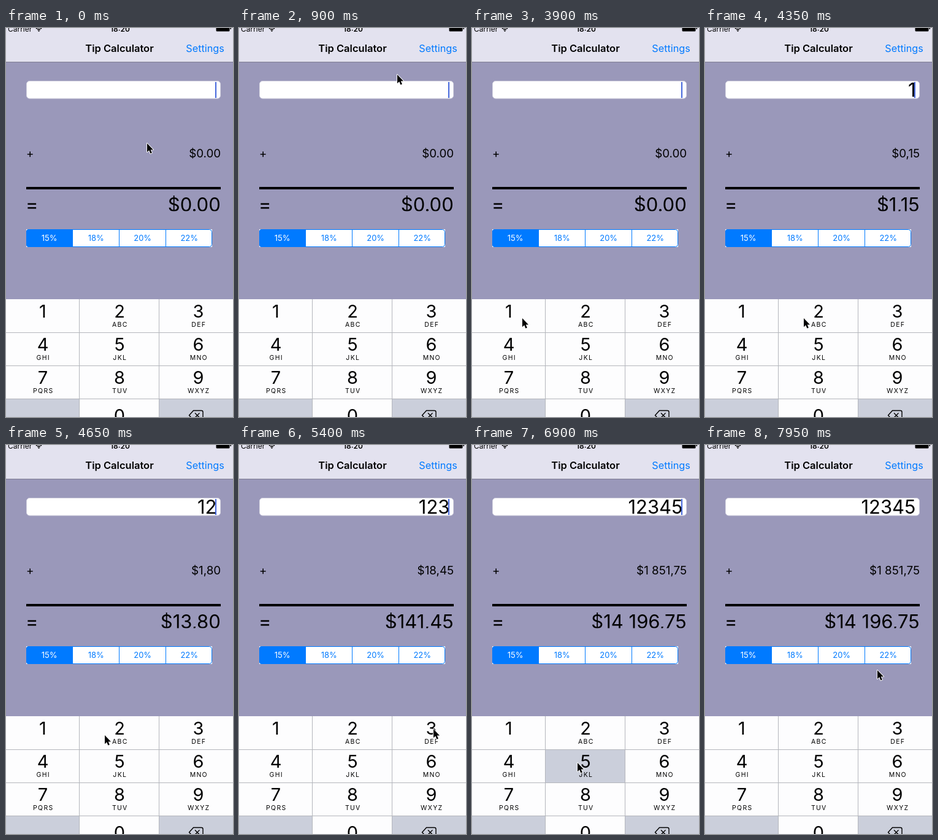
An HTML page that plays this animation: 370x634 px, repeating every 8 s.

```html
<!DOCTYPE html>
<html lang="en">
<head>
<meta charset="utf-8">
<title>Tip Calculator</title>
<style>
html, body { margin: 0; width: 100%; height: 100%; overflow: hidden; background: #9a98ba; }
svg { display: block; font-family: Inter, Roboto, sans-serif; font-optical-sizing: none; }
.mid { text-anchor: middle; }
.end { text-anchor: end; }
.blue { fill: #007aff; }
.digit { font-size: 29px; }
.letters { font-size: 10.5px; letter-spacing: 1.3px; }
.big { font-size: 31px; }
.small { font-size: 18.8px; }
</style>
</head>
<body>
<svg width="370" height="634" viewBox="0 0 370 634">
  <clipPath id="cut"><rect x="0" y="270" width="370" height="28.5"/></clipPath>
  <rect width="370" height="634" fill="#9a98ba"/>

  <rect width="370" height="55" fill="#e3e2ef"/>
  <rect y="55" width="370" height="1" fill="#7f7e92"/>
  <text x="3" y="6" font-size="12">Carrier</text>
  <path d="M49 1.2Q53.5 -2.6 58 1.2M51 3Q53.5 1 56 3" fill="none" stroke="#000" stroke-width="1.4"/>
  <circle cx="53.5" cy="4.6" r="1.2"/>
  <text class="mid" x="186" y="6" font-size="12" font-weight="600">18:20</text>
  <rect x="342.5" y="-5" width="22" height="10.5" rx="1.5"/>
  <rect x="365.5" y="-2" width="1.5" height="4"/>
  <text class="mid" x="185" y="39" font-size="16.5" font-weight="600">Tip Calculator</text>
  <text class="end blue" x="355.7" y="39" font-size="16.2">Settings</text>

  <rect x="33.5" y="86.5" width="316" height="28.5" rx="5" fill="#fff" stroke="#d0cfde"/>
  <text id="bill" class="end big" x="343.5" y="112.2"></text>
  <rect id="caret" x="341" y="88" width="2" height="26" fill="#4668dc"/>
  <text class="small" x="33" y="210.7">+</text>
  <text id="tip" class="end small" x="350.2" y="211"></text>
  <rect x="33" y="259" width="317" height="4"/>
  <text class="big" x="32" y="298.5">=</text>
  <g clip-path="url(#cut)"><text id="total" class="end big" x="349.7" y="299"></text></g>

  <rect x="33" y="328" width="303" height="29" fill="#fff"/>
  <rect x="33.5" y="328.5" width="302" height="28" rx="4" fill="#fff" stroke="#007aff"/>
  <path class="blue" d="M109 328H37a4 4 0 0 0-4 4v21a4 4 0 0 0 4 4h72z"/>
  <g id="rates" class="mid" font-size="13"></g>
  <g id="keys"></g>
  <path d="M305.5 623.5H318.5Q321 623.5 321 626V636.5Q321 639 318.5 639H305.5L298.5 631.2ZM308 627.5l7.5 7.5m0-7.5l-7.5 7.5" fill="none" stroke="#000" stroke-width="1.4"/>
  <path id="pointer" d="M0 0V14.2L3.2 11.3L5.4 16.6L7.9 15.5L5.7 10.4H10Z" stroke="#fff" stroke-width="1.8" paint-order="stroke" stroke-linejoin="round"/>
</svg>
<script>
const LOOP = 8000, STEP = 150, WHITE = "#fdfdfe", GREY = "#cbcfdb", LINE = "#b4b6bc";
const $ = id => document.getElementById(id);
const clamp = v => Math.min(1, Math.max(0, v));

function add(parent, tag, attrs, text = "") {
  const el = document.createElementNS("http://www.w3.org/2000/svg", tag);
  for (const k in attrs) el.setAttribute(k, attrs[k]);
  el.textContent = text;
  return $(parent).appendChild(el);
}

["15%", "18%", "20%", "22%"].forEach((rate, i) => {
  add("rates", "text", { x: 70.7 + 76 * i, y: 347, fill: i ? "#007aff" : "#fff" }, rate);
  if (i) add("rates", "rect", { x: 32 + 76 * i, y: 328, width: 1, height: 29, fill: "#007aff" });
});

// Keypad: digits 1-9, then blank, 0 and delete; the right column runs off the stage
const edges = [0, 120, 250, 377];
const letters = ["", "ABC", "DEF", "GHI", "JKL", "MNO", "PQRS", "TUV", "WXYZ"];
const labels = [..."123456789", "", "0", ""];
const keys = labels.map((label, i) => {
  const x = edges[i % 3], width = edges[i % 3 + 1] - x, y = 442 + 54 * Math.floor(i / 3);
  const mid = x + width / 2, small = letters[i];
  const key = add("keys", "rect", { x, y, width, height: 54, fill: label ? WHITE : GREY });
  add("keys", "text", { class: "mid digit", x: mid, y: y + (i < 9 ? 30 : 38) }, label);
  if (small) add("keys", "text", { class: "mid letters", x: mid + 0.8, y: y + 45 }, small);
  return key;
});
for (let i = 1; i < 4; i++) {
  add("keys", "rect", { y: 442 + 54 * i, width: 370, height: 1, fill: LINE });
  if (i < 3) add("keys", "rect", { x: edges[i] - 1, y: 442, width: 1, height: 192, fill: LINE });
}

// Pointer moves; those with a key press it one step after arriving
const origin = { x: 230, y: 188 };
const moves = [
  { from: 150, to: 900, x: 258, y: 76 },
  { from: 3000, to: 3900, x: 82, y: 473, key: 1 },
  { from: 4050, to: 4350, x: 161, y: 473, key: 2 },
  { from: 4650, to: 5100, x: 317, y: 463, key: 3 },
  { from: 5400, to: 5850, x: 65, y: 512, key: 4 },
  { from: 6150, to: 6750, x: 172, y: 518, key: 5 },
  { from: 7350, to: 7950, x: 281, y: 367 }
];
const presses = moves.filter(m => m.key).map(m => ({ key: m.key, at: m.to + STEP }));

function pointerAt(t) {
  let { x, y } = origin;
  for (const m of moves) {
    const k = clamp((t - m.from) / (m.to - m.from)), ease = k * k * (3 - 2 * k);
    x += (m.x - x) * ease;
    y += (m.y - y) * ease;
  }
  return [x, y];
}

function money(v) {
  if (!v) return "$0.00";
  const [whole, cents] = v.toFixed(2).split(".");
  return "$" + whole.replace(/\B(?=(\d{3})+$)/g, " ") + "," + cents;
}

// Blink: lit, quick fade out, dark, quick fade in
function caretAlpha(since) {
  const p = since % 1040;
  return clamp(Math.max((600 - p) / 60, (p - 1000) / 40));
}

function draw(now) {
  const t = Math.floor(now % LOOP / STEP) * STEP;
  const typed = presses.filter(p => p.at <= t);
  const bill = typed.map(p => p.key).join("");
  const blinkStart = typed.length ? typed.at(-1).at + 50 : -270;

  $("bill").textContent = bill;
  $("tip").textContent = money(bill * 0.15);
  $("total").textContent = money(bill * 1.15);
  $("caret").setAttribute("opacity", caretAlpha(t - blinkStart));
  for (const p of presses) keys[p.key - 1].setAttribute("fill", t === p.at ? GREY : WHITE);
  $("pointer").setAttribute("transform", `translate(${pointerAt(t)})`);
}

const start = performance.now();
function tick() {
  draw(performance.now() - start);
  requestAnimationFrame(tick);
}
tick();
</script>
</body>
</html>
```
